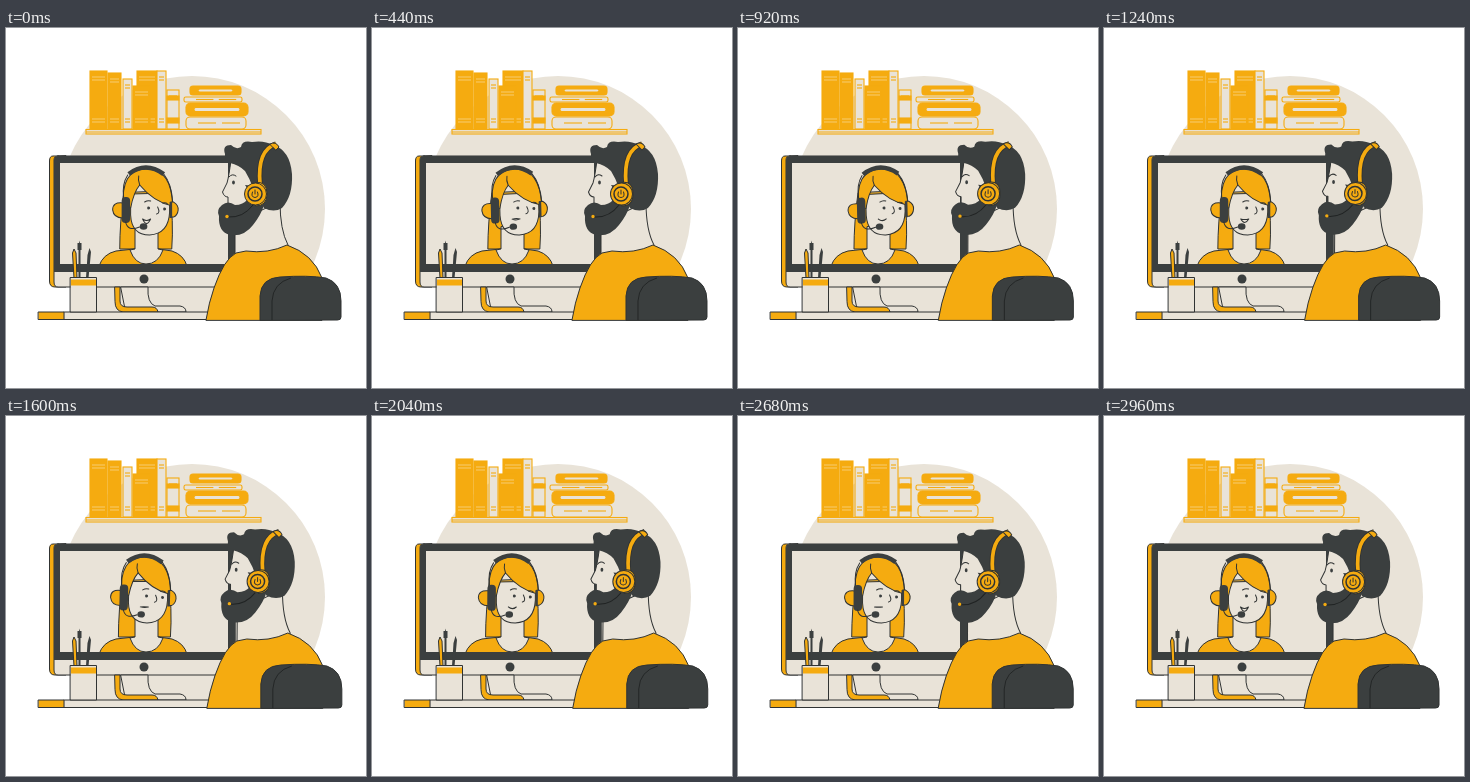
These frames come from a looping animation (360x360 px, 3 s). An HTML page:

```html
<!DOCTYPE html>
<html lang="en">
<head>
<meta charset="utf-8">
<title>Video call</title>
<style>
  html, body { margin: 0; width: 100%; height: 100%; overflow: hidden; background: #fff; }
  svg { display: block; width: 100vw; height: 100vh; }
  .y { fill: #f5ab10; }
  .d { fill: #3b3f3f; }
  .b { fill: #e9e3d8; }
  .n { fill: none; }
  .o { stroke: #303333; stroke-width: 1; stroke-linejoin: round; stroke-linecap: round; }
  .g { stroke: #f5ab10; stroke-width: 1.1; }
  .l { stroke: #f8d48a; stroke-width: .8; fill: none; }
</style>
</head>
<body>
<svg viewBox="0 0 360 360">
  <defs>
    <clipPath id="floor"><rect width="360" height="288"/></clipPath>
    <clipPath id="screen"><rect x="54" y="135" width="168" height="101"/></clipPath>
  </defs>

  <circle class="b" cx="186" cy="181" r="133" clip-path="url(#floor)"/>
  <rect class="b" x="90" y="258" width="115" height="27"/>
  <g id="books"></g>

  <!-- monitor -->
  <path class="y o" d="M50 128H47Q43.500 128 43.500 133V253Q43.500 259 49 259H60V128Z"/>
  <path class="b o" d="M52 128H224Q229 128 229 133V259H52Q48 259 48 254V132Q48 128 52 128Z"/>
  <path class="d" d="M52 128H225Q229.500 128 229.500 132V244H48V132Q48 128 52 128Z"/>
  <rect class="b" x="54" y="135" width="168" height="101"/>
  <circle class="d" cx="138" cy="251" r="4.500"/>

  <!-- caller -->
  <g clip-path="url(#screen)">
    <path class="y o" id="hairBack" d="M118 165Q114 195 114 221H166Q168 193 164 163Z"/>
    <path class="y o" d="M93 238Q97 226 110 223L128 221H153L166 223Q178 227 181 238Z"/>
    <path class="b o" d="M129 199V221L124 222Q129 236 140 236Q152 236 157 222L152 221V199Z"/>
    <g id="caller">
      <path class="b o" d="M125 166V187Q126 207 144 207Q163 206 164 184V165Z"/>
      <path class="y o" d="M118 180Q114 141 141 141Q166 141 167 178Q148 174 134 157Q128 164 125 180Z"/>
      <path class="n o" d="M134 157Q132 152 133 148"/>
      <path class="n" d="M123 146Q140 133 158 146" stroke="#3b3f3f" stroke-width="4.500"/>
      <path class="n o" d="M122 147Q116 156 118 170M158 146Q166 156 167 174"/>
      <path class="y o" d="M117 175Q107 174 107 182Q108 190 117 190Z"/>
      <rect class="d" x="116" y="169" width="8.500" height="26" rx="4"/>
      <path class="y o" d="M165 174H168Q173 177 172.500 182Q172 187 168 189H165Z"/>
      <path class="d" d="M164 174H166.500V190H164Z"/>
      <circle class="d" cx="143" cy="180" r="1.500"/>
      <circle class="d" cx="159" cy="181" r="1.500"/>
      <path class="n o" d="M139 174Q142 172 145 173M157 175Q160 174 162 176M152 179Q155 185 151 186"/>
      <path class="b o" id="mouth"/>
      <path class="n o" d="M120 194Q122 204 134 199"/>
      <ellipse class="d" cx="138" cy="198.500" rx="3.800" ry="3.200"/>
    </g>
  </g>

  <!-- stand, desk and cup -->
  <path class="b o" d="M115 259H142Q141 275 149 278H174Q180 279 180 284H120Z"/>
  <path class="y o" d="M109 259H114V273Q114 279 121 279H146Q151 279 152 284H117Q109 283 109 274Z"/>
  <rect class="b o" x="58" y="284" width="149" height="7.500"/>
  <rect class="y o" x="32.500" y="284" width="25.500" height="7.500"/>
  <path class="y o" d="M68 250L66.500 225L68 221L70 225L71 250Z"/>
  <path class="d" d="M72.500 250V222H71.500V215H73L73.500 212.500L74 215H75.500V222H74.500V250Z"/>
  <path class="d" d="M80 250L81.500 227L83.500 220L85 224L82.500 250Z"/>
  <rect class="b o" x="64.500" y="249.500" width="26" height="34.500"/>
  <rect class="y" x="65" y="251.500" width="25" height="6"/>

  <!-- viewer -->
  <g id="viewer">
    <path class="b o" d="M229 195V228H282V217Q274 202 274 174Z"/>
    <path class="b o" d="M225 132Q223 148 221 155L216.500 164Q218 169 222 169V184L250 190L262 160L255 134Z"/>
    <path class="d" d="M219 126Q216 117 225 117Q230 122 235 119Q236 112 246 114Q258 112 267 117Q284 122 286 146Q287 168 276 180Q268 185 258 180L247 160Q244 151 239 143Q233 137 224 135Q218 131 219 126Z"/>
    <path class="d" d="M239 157Q244 163 242 171Q237 177 229 177Q222 172 216 177Q210 182 213 188Q212 204 224 207Q238 209 247 197Q255 187 258 177L249 158Z"/>
    <ellipse class="d" id="eye" cx="227.500" cy="154.500" rx="1.400"/>
    <path class="n o" d="M223 149Q226 145 230 148"/>
    <path class="n" d="M254 156Q251 122 270 116" stroke="#303333" stroke-width="5.500"/>
    <path class="n" d="M254 156Q251 122 270 116" stroke="#f5ab10" stroke-width="3.700"/>
    <path class="y o" d="M264 116Q270 113 273 119L270 122Z"/>
    <path class="n" d="M247 177Q237 190 222 189" stroke="#202323"/>
    <circle class="y" cx="221" cy="188.500" r="1.700"/>
    <path class="y o" d="M250 154.500Q261 153 261 166Q261 178 250 178Z"/>
    <circle class="y o" cx="249.500" cy="166" r="11"/>
    <circle class="y o" cx="249" cy="166" r="7" style="stroke-width:1.500"/>
    <path class="n o" d="M246.500 164Q244.500 169 249 169.500Q253.500 169 251.500 164M249 162V166"/>
  </g>
  <g id="body">
    <path class="y o" d="M200 292Q203 274 208 260Q218 231 230 225L240 223Q262 226 281 217Q307 226 316 250V292Z"/>
    <path class="d o" d="M254 292V268Q255 250 274 249Q302 247 320 250Q335 255 335 273V289Q335 292 332 292Z"/>
    <path class="n" d="M266 292V273Q267 255 285 250" stroke="#232626"/>
  </g>
</svg>

<script>
const LOOP = 3000, STEP = 40, BLINK = 2360, BOTTOM = 101;
const { sin, cos, abs, min, max, floor, PI } = Math;
const el = id => document.getElementById(id);

const box = (cls, x, y, w, h, rx = 0) =>
  `<rect class="${cls} g" x="${x}" y="${y}" width="${w}" height="${h}" rx="${rx}"/>`;
const line = (cls, x, y, w) => `<path class="${cls}" d="M${x} ${y}h${w}"/>`;

// Upright book with a pair of stripes near each end
function upright(cls, x, top, w) {
  const ink = cls === "y" ? "l" : "n g";
  const stripes = [top + 6, top + 9, BOTTOM - 10, BOTTOM - 7];
  return box(cls, x, top, w, BOTTOM - top) + stripes.map(y => line(ink, x + 2, y, w - 4)).join("");
}

// Lying book: rounded cover with a band of pages
function lying(cls, x, y, w, h) {
  const pages = cls === "y"
    ? box("b", x + 8, y + h / 3, w - 16, h / 3, 2)
    : line("n g", x + 12, y + h / 2, w * .3) + line("n g", x + w * .6, y + h / 2, w * .3);
  return box(cls, x, y, w, h, h / 3) + pages;
}

el("books").innerHTML = [
  upright("y", 84, 43, 17), upright("y", 102, 45, 13), upright("b", 117, 51, 9),
  upright("y", 131, 43, 20), upright("b", 151, 43, 9), upright("y", 127, 58, 17),
  upright("b", 161, 62, 12), box("y", 161, 68, 12, 4), box("y", 161, 90, 12, 5),
  lying("y", 184, 58, 51, 9), lying("b", 178, 69, 58, 5),
  lying("y", 180, 75, 62, 13), lying("b", 180, 89, 60, 12),
  box("b", 80, 101.500, 175, 4.500), line("n g", 80, 104, 175)
].join("");

const place = (id, x, y = 0, r = 0, cx = 0, cy = 0) =>
  el(id).setAttribute("transform", `translate(${x} ${y}) rotate(${r} ${cx} ${cy})`);

function draw(now) {
  const t = floor(now % LOOP / STEP) * STEP;
  const a = 2 * PI * t / LOOP;

  // The caller nods sideways twice, leaning further right than left.
  const nod = .4 + 2 * sin(a) + cos(a) - 1.8 * cos(2 * a);
  place("caller", nod, 0, -nod / 2, 142, 190);
  place("hairBack", nod * .6);

  const smile = 1 + 2 * cos(3 * a);
  const open = max(.5, 3 + 3 * cos(5 * a));
  el("mouth").setAttribute("d",
    `M137 191Q141 ${191 + smile} 145 191Q141 ${191 + smile + open} 137 191Z`);

  // The viewer rocks back and forth once.
  const rock = 1 - cos(a) - .5 * sin(a);
  place("viewer", rock, -rock / 4, rock / 4, 255, 220);
  place("body", rock * .4);
  el("eye").setAttribute("ry", min(2, .3 + abs(t - BLINK) / 50));
}

const start = performance.now();
function tick() {
  draw(performance.now() - start);
  requestAnimationFrame(tick);
}
tick();
</script>
</body>
</html>
```
